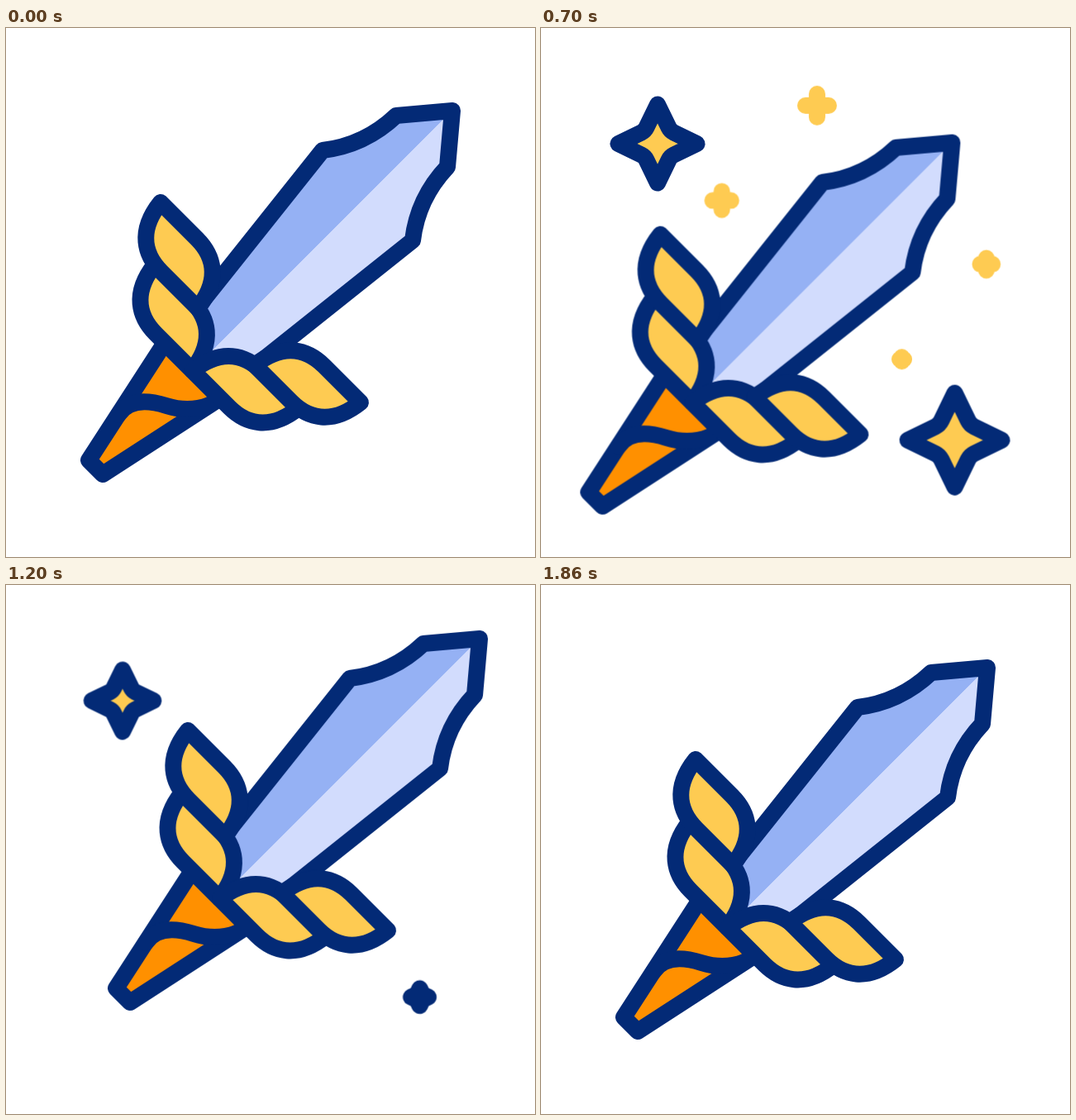
Animation of 640 by 640 pixels, one loop 2400 ms. Source, as an HTML page:

```html
<!DOCTYPE html>
<html lang="en">
<head>
<meta charset="utf-8">
<title>Sword</title>
<style>
  html, body { margin: 0; width: 100%; height: 100%; overflow: hidden; background: #fff; }
  svg { display: block; width: 100%; height: 100%; }

  .line { stroke: #032a76; stroke-width: 20; stroke-linecap: round; stroke-linejoin: round; fill: none; }
  .steel { fill: #95b1f4; }
  .shine { fill: #d2dcfd; }
  .rope, .star { fill: #fecb52; }
  .grip { fill: #ff9000; }
  .plus { stroke: #fecb52; }

  .sword, .spark {
    animation: 2400ms cubic-bezier(.333, 0, .667, 1) infinite;
  }
  .sword { animation-name: swing; }
  /* Sparks grow from a point while their stroke keeps its width. */
  .spark { vector-effect: non-scaling-stroke; transform-origin: 0 0; }

  @keyframes swing {
    0%, 3.33% { transform: translate(0, 0); animation-timing-function: cubic-bezier(.53, 0, .667, 1); }
    28.2% { transform: translate(-43px, 39px); }
    53.2% { transform: translate(36.5px, -38.5px); animation-timing-function: cubic-bezier(.333, 0, .47, 1); }
    77.5%, 100% { transform: translate(0, 0); }
  }

  .star-left { animation-name: star-left; }
  @keyframes star-left {
    0%, 12% { transform: scale(0); visibility: hidden; }
    35.8%, 38.33% { transform: scale(58.5); visibility: visible; }
    67.1%, 100% { transform: scale(0); visibility: hidden; }
  }

  .star-right { animation-name: star-right; }
  @keyframes star-right {
    0%, 3.63% { transform: scale(0); visibility: hidden; }
    31.75% { transform: scale(58.3); visibility: visible; }
    32.1% { transform: scale(58.3); visibility: visible; animation-timing-function: cubic-bezier(.5, 0, .667, 1); }
    55.8%, 100% { transform: scale(0); visibility: hidden; }
  }

  .plus-left { animation-name: plus-left; }
  @keyframes plus-left {
    0%, 9.4% { transform: scale(0); visibility: hidden; }
    25.4% { transform: scale(13); visibility: visible; }
    41.5%, 100% { transform: scale(0); visibility: hidden; }
  }

  .plus-low { animation-name: plus-low; }
  @keyframes plus-low {
    0%, 3.96% { transform: scale(0); visibility: hidden; }
    18.5% { transform: scale(14.3); visibility: visible; }
    33.1%, 100% { transform: scale(0); visibility: hidden; }
  }

  .plus-right { animation-name: plus-right; }
  @keyframes plus-right {
    0%, 5.5% { transform: scale(0); visibility: hidden; }
    21.3% { transform: scale(14.2); visibility: visible; }
    37.5%, 100% { transform: scale(0); visibility: hidden; }
  }

  .plus-top { animation-name: plus-top; }
  @keyframes plus-top {
    0%, 14.25% { transform: scale(0); visibility: hidden; }
    29.6% { transform: scale(14); visibility: visible; }
    45.9%, 100% { transform: scale(0); visibility: hidden; }
  }
</style>
</head>
<body>
<svg viewBox="0 0 640 640">
  <defs>
    <path id="strand" d="M187 211L231 255C251 275 260 304 232 339L188 295C168 275 159 246 187 211Z"/>
    <g id="guard">
      <use href="#strand" x="-6.8" y="75"/>
      <use href="#strand"/>
    </g>
  </defs>

  <g class="sword">
    <path class="steel" d="M540 100L472 106Q434 142 383 148L234 335L226 414Z"/>
    <path class="shine" d="M540 100L226 414L305 406L492 257Q498 206 534 168Z"/>
    <path class="line" d="M540 100L472 106Q434 142 383 148L234 335L226 414L305 406L492 257Q498 206 534 168Z"/>

    <path class="line grip" d="M100 523L192 381L259 448L117 540Z"/>
    <path class="line" d="M136 468C150 446 178 452 194 457S228 463 246 456"/>

    <g class="line rope">
      <use href="#guard"/>
      <use href="#guard" transform="matrix(0 -1 -1 0 640 640)"/>
    </g>
  </g>

  <g transform="translate(141 140)">
    <path class="line star spark star-left" d="M0-1L.285-.413Q.327-.327 .413-.285L1 0L.413 .285Q.327 .327 .285 .413L0 1L-.285 .413Q-.327 .327-.413 .285L-1 0L-.413-.285Q-.327-.327-.285-.413Z"/>
  </g>
  <g transform="translate(500.5 498.5)">
    <path class="line star spark star-right" d="M0-1L.285-.413Q.327-.327 .413-.285L1 0L.413 .285Q.327 .327 .285 .413L0 1L-.285 .413Q-.327 .327-.413 .285L-1 0L-.413-.285Q-.327-.327-.285-.413Z"/>
  </g>

  <g transform="translate(218.7 208.7)"><path class="line plus spark plus-left" d="M-1 0H1M0-1V1"/></g>
  <g transform="translate(436.5 400.8)"><path class="line plus spark plus-low" d="M-1 0H1M0-1V1"/></g>
  <g transform="translate(538.8 285.7)"><path class="line plus spark plus-right" d="M-1 0H1M0-1V1"/></g>
  <g transform="translate(334 93.7)"><path class="line plus spark plus-top" d="M-1 0H1M0-1V1"/></g>
</svg>
</body>
</html>
```
